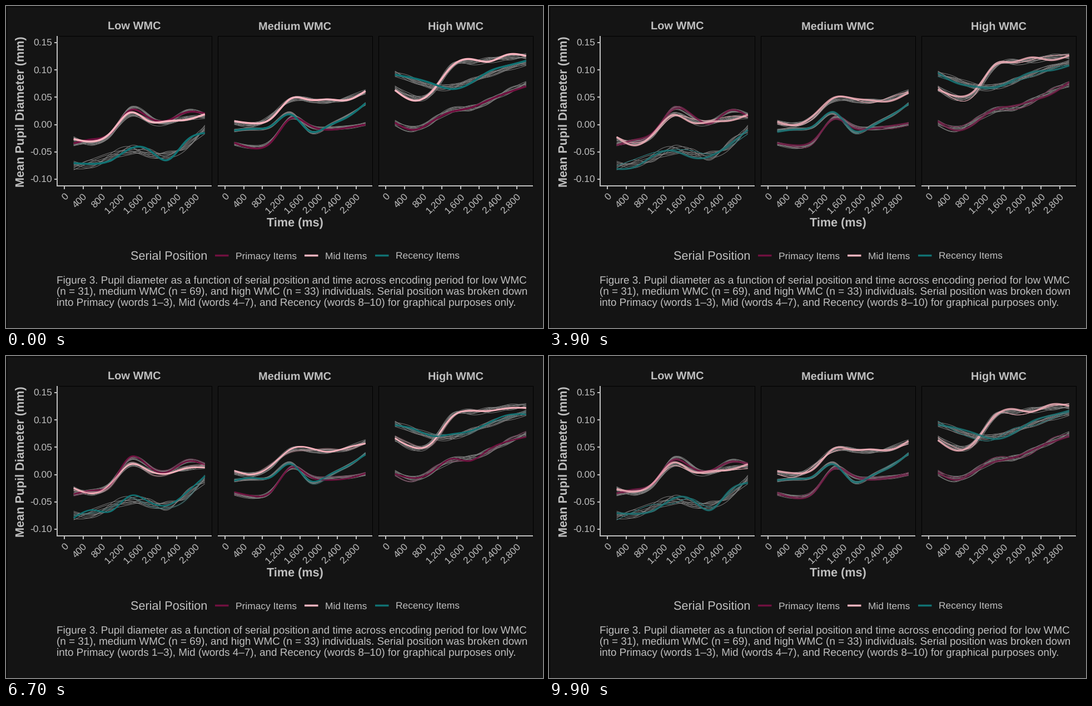
Animation, 966 px wide and 580 px high, one loop 10 s. Source, as a matplotlib script:

```python
import numpy as np
import matplotlib.pyplot as plt
from matplotlib.animation import FuncAnimation
from matplotlib.patches import Rectangle

plt.rcParams["font.family"] = "Liberation Sans"
plt.rcParams["text.hinting"] = "none"

W, H, DPI = 966, 580, 100
BG, INK, GHOST = "#141414", "#bfbfbf", "#7f7f7f"
MAROON, PINK, TEAL = "#70103f", "#ffb5c0", "#107273"
LINE, THIN = 3.5, 0.9
DRAWS, STEPS, HOLD = 10, 10, 7

TOP, BOTTOM = 54, 324
LEFTS, PANEL_W = (92, 381, 670), 278
T0, T_SCALE = 104.8, 0.0843
Y0, Y_SCALE = 213.6, 0.984      # pixel of 0 mm, pixels per 0.001 mm

KNOTS = np.arange(200, 3001, 400)
TIME = np.linspace(200, 3000, 141)
rng = np.random.default_rng(31)


def pt(px):
    return px * 72 / DPI


def x_px(t, panel):
    return T0 + 289 * panel + T_SCALE * np.asarray(t)


def y_px(v):
    return Y0 - Y_SCALE * np.asarray(v)


def spline(knots, values, x):
    """Natural cubic spline on evenly spaced knots."""
    n, h = len(knots), knots[1] - knots[0]
    m = np.eye(n)
    rhs = np.zeros(n)
    for i in range(1, n - 1):
        m[i, i - 1:i + 2] = 1, 4, 1
        rhs[i] = 6 * (values[i - 1] - 2 * values[i] + values[i + 1]) / h ** 2
    c = np.linalg.solve(m, rhs)
    k = np.clip(((x - knots[0]) // h).astype(int), 0, n - 2)
    b = (x - knots[k]) / h
    a = 1 - b
    return (a * values[k] + b * values[k + 1]
            + ((a ** 3 - a) * c[k] + (b ** 3 - b) * c[k + 1]) * h ** 2 / 6)


def family(panel, color, reach, *mean):
    """Ten draws spread evenly within +-reach of the mean at every knot."""
    offsets = np.tile(np.linspace(-reach, reach, DRAWS), (len(KNOTS), 1))
    draws = np.array(mean) + rng.permuted(offsets, axis=1).T
    return x_px(TIME, panel), color, [y_px(spline(KNOTS, v, TIME)) for v in draws]


# Mean curves through a few key points, in 0.001 mm
families = [
    family(0, MAROON, 3, -36, -30, -15, 29, 16, 5, 24, 18),
    family(0, PINK, 4, -26, -34, -17, 18, 7, 4, 11, 15),
    family(0, TEAL, 8, -75, -71, -59, -47, -52, -57, -38, -9),
    family(1, MAROON, 3, -35, -41, -29, 12, -2, -7, -5, 1),
    family(1, PINK, 4, 4, 0, 16, 45, 45, 43, 47, 60),
    family(1, TEAL, 2.5, -11, -8, -2, 21, -12, -3, 15, 38),
    family(2, MAROON, 5, 3, -8, 7, 26, 30, 43, 60, 74),
    family(2, PINK, 5, 66, 49, 60, 106, 115, 118, 123, 125),
    family(2, TEAL, 5, 93, 81, 70, 69, 79, 92, 104, 113),
]

fig = plt.figure(figsize=(W / DPI, H / DPI), dpi=DPI, facecolor=BG)
ax = fig.add_axes([0, 0, 1, 1])
ax.set_xlim(0, W)
ax.set_ylim(H, 0)
ax.axis("off")


def stroke(xs, ys, color=INK, width=2.0, **kw):
    return ax.plot(xs, ys, color=color, lw=pt(width),
                   solid_capstyle="butt", **kw)[0]


def label(x, y, text, size, ha="left", **kw):
    ax.text(x, y, text, fontsize=pt(size), color=INK, ha=ha, va="baseline", **kw)


def frame(x, y, w, h):
    ax.add_patch(Rectangle((x, y), w, h, fill=False, ec="black", lw=pt(1)))


# Panels and axes
frame(0.5, 0.5, W - 1, H - 1)
for p, (left, name) in enumerate(zip(LEFTS, ("Low", "Medium", "High"))):
    frame(left, TOP, PANEL_W, BOTTOM - TOP)
    stroke([left - (p == 0), left + PANEL_W], [BOTTOM, BOTTOM], zorder=2)
    label(left + PANEL_W / 2, 43, name + " WMC", 20, "center", weight="bold")
    for t in range(0, 2801, 400):
        x = float(x_px(t, p))
        stroke([x, x], [BOTTOM, BOTTOM + 5.5])
        label(x + 8.9, 344.5, f"{t:,}", 17.33, "right",
              rotation=45, rotation_mode="anchor")
stroke([LEFTS[0]] * 2, [TOP, BOTTOM + 1], zorder=2)
for v in range(-100, 151, 50):
    y = float(y_px(v))
    stroke([86.5, LEFTS[0]], [y, y])
    label(83, y + 6.2, f"{v / 1000:.2f}", 17.33, "right")
label(520, 397.6, "Time (ms)", 21.67, "center", weight="bold")
label(33.5, 189.7, "Mean Pupil Diameter (mm)", 21.67, "center",
      weight="bold", rotation=90, rotation_mode="anchor")

# Legend and caption
label(224, 457.3, "Serial Position", 21.67)
for key_x, text_x, name, color in (
        (376, 413, "Primacy Items", MAROON),
        (537, 573.7, "Mid Items", PINK),
        (664, 700.7, "Recency Items", TEAL)):
    stroke([key_x, key_x + 24.5], [449.5, 449.5], color, LINE, snap=False)
    label(text_x, 455.6, name, 17.33)
CAPTION = (
    "Figure 3. Pupil diameter as a function of serial position and time "
    "across encoding period for low WMC",
    "(n = 31), medium WMC (n = 69), and high WMC (n = 33) individuals. "
    "Serial position was broken down",
    "into Primacy (words 1–3), Mid (words 4–7), and Recency (words 8–10) "
    "for graphical purposes only.",
)
for i, text in enumerate(CAPTION):
    label(91, 499.6 + 20.4 * i, text, 18.83)

# Faint curves for every draw, with the outgoing and incoming draw on top
leaving, entering = [], []
for xs, color, curves in families:
    for ys in curves:
        stroke(xs, ys, GHOST, THIN, zorder=3)
    leaving.append(stroke(xs, curves[0], color, LINE, zorder=4))
    entering.append(stroke(xs, curves[0], color, LINE, zorder=5))


def update(i):
    """Hold a draw, then shrink it away while the next one fades in."""
    draw, step = divmod(i, STEPS)
    t = max(0, step - HOLD + 1) / (STEPS - HOLD + 1)
    following = (draw + 1) % DRAWS
    for (_, _, curves), old, new in zip(families, leaving, entering):
        old.set_ydata(curves[draw])
        old.set_linewidth(pt(LINE * (1 - t)))
        new.set_ydata(curves[following])
        new.set_alpha(t)
    return leaving + entering


anim = FuncAnimation(fig, update, frames=DRAWS * STEPS, interval=100,
                     repeat=True, repeat_delay=0, blit=False)
plt.show()
```
